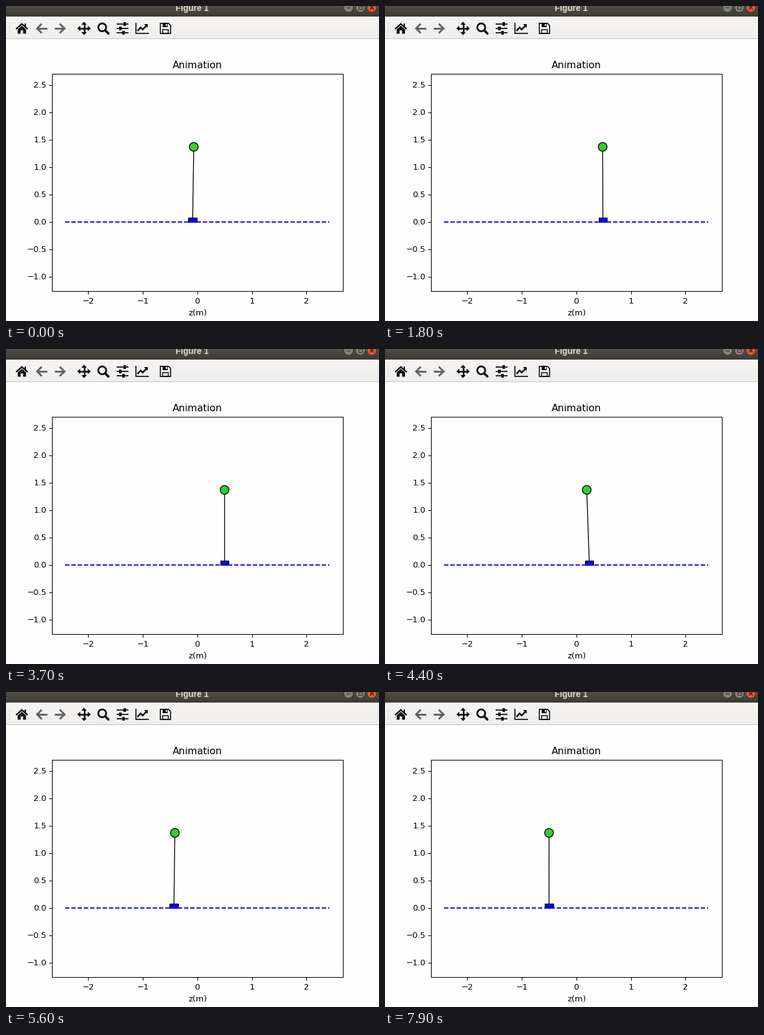
A matplotlib script that plays this animation: 600 px wide and 506 px high, repeating every 8 s.

```python
import numpy as np
import matplotlib.pyplot as plt
from matplotlib.animation import FuncAnimation
from matplotlib.patches import Circle, Polygon, Rectangle

W, H, DPI = 600, 506, 100
FRAMES, STEP_MS = 80, 100
PT = 72 / DPI  # points per pixel
SANS = "DejaVu Sans"
INK, GREY = "#0c0c0c", "#626262"

# the tiny margin keeps the pixel size from being rounded down
fig = plt.figure(figsize=(W / DPI + 1e-6, H / DPI + 1e-6), dpi=DPI,
                 facecolor="#fefefe")
ax = fig.add_axes([0, 0, 1, 1])
ax.set_xlim(0, W)
ax.set_ylim(H, 0)
ax.axis("off")


def line(xs, ys, color="black", w=1.1, z=2, cap="butt", **kw):
    return ax.plot(xs, ys, color=color, lw=w * PT, zorder=z,
                   solid_capstyle=cap, solid_joinstyle="miter", **kw)[0]


def rect(x0, y0, x1, y1, color, edge="none", w=0, z=1):
    return ax.add_patch(Rectangle((x0, y0), x1 - x0, y1 - y0, fc=color,
                                  ec=edge, lw=w * PT, zorder=z))


def poly(points, color=INK, z=3):
    ax.add_patch(Polygon(points, fc=color, ec="none", zorder=z))


def disc(x, y, r, color, edge="none", w=0, z=3):
    return ax.add_patch(Circle((x, y), r, fc=color, ec=edge, lw=w * PT, zorder=z))


def text(x, y, s, px, ha="center", va="baseline", color="black", **kw):
    kw.setdefault("family", SANS)
    ax.text(x, y, s, fontsize=px * PT, ha=ha, va=va, color=color, zorder=4, **kw)


def gradient(y0, y1, top, bottom):
    a, b = np.array(top), np.array(bottom)
    for y in range(y0, y1):
        k = (y - y0) / (y1 - y0 - 1)
        rect(0, y, W, y + 1, tuple((a + (b - a) * k) / 255))


def title_bar():
    gradient(0, 17, (80, 77, 71), (61, 59, 55))
    text(299.5, 7.5, "Figure 1", 13.6, color="#dfdbd2",
         family="Liberation Sans", weight="bold")
    for x in (551, 570):
        disc(x, 2.5, 7.6, "#85827a", "#34332f", 1)
    disc(588.5, 2.5, 7.6, "#e9592b", "#34332f", 1)
    line([548, 554], [3, 3], "#3c3b37", 1.5, 4)
    rect(567, 0, 573, 5.5, "none", "#3c3b37", 1.3, 4)
    for s in (-1, 1):
        line([588.5 - 3, 588.5 + 3], [2.5 - 3 * s, 2.5 + 3 * s], "#4a2415", 1.6, 4)


def home(x, y):
    line([x - 9.3, x, x + 9.3], [y + 1, y - 7.2, y + 1], INK, 2.4, 3)
    rect(x + 4, y - 8, x + 6.6, y - 2, INK, z=3)
    poly([(x - 6.7, y + 1.6), (x, y - 4.2), (x + 6.7, y + 1.6), (x + 6.7, y + 8.5),
          (x + 2, y + 8.5), (x + 2, y + 3.2), (x - 2, y + 3.2), (x - 2, y + 8.5),
          (x - 6.7, y + 8.5)])


def arrow(x, y, s):
    line([x - 7.5 * s, x + 9 * s], [y, y], GREY, 3, 3)
    line([x + 0.5 * s, x - 7 * s, x + 0.5 * s], [y - 7.5, y, y + 7.5], GREY, 3, 3)


def move(x, y):
    line([x - 8, x + 8], [y, y], INK, 2.6, 3)
    line([x, x], [y - 8, y + 8], INK, 2.6, 3)
    for dx, dy in ((1, 0), (-1, 0), (0, 1), (0, -1)):
        bx, by = x + 6 * dx, y + 6 * dy
        poly([(x + 10.7 * dx, y + 10.7 * dy),
              (bx + 4.4 * dy, by + 4.4 * dx), (bx - 4.4 * dy, by - 4.4 * dx)])


def zoom(x, y):
    disc(x - 1.7, y - 1.7, 6.3, "none", INK, 2.8)
    line([x + 3, x + 8.2], [y + 3, y + 8.2], INK, 3.8, 3, "round")


def sliders(x, y):
    for dy, knob in ((-7, 3), (0, -4), (7, 1)):
        line([x - 9.5, x + 9.5], [y + dy, y + dy], INK, 1.8, 3)
        rect(x + knob - 2, y + dy - 2.6, x + knob + 2, y + dy + 2.6, INK, z=3)


def chart(x, y):
    line([x - 10.2, x - 10.2, x + 11], [y - 9, y + 8.3, y + 8.3], INK, 1.7, 3)
    line([x - 7.5, x - 2.5, x + 0.8, x + 7], [y + 4, y - 1.5, y + 1.8, y - 4.5],
         INK, 2.6, 3)
    poly([(x + 3.2, y - 7.2), (x + 9.2, y - 7.2), (x + 9.2, y - 1.2)])


def save(x, y):
    ax.add_patch(Polygon([(x - 8.2, y - 8.2), (x + 4.8, y - 8.2), (x + 8.2, y - 4.8),
                          (x + 8.2, y + 8.2), (x - 8.2, y + 8.2)],
                         fc="none", ec=INK, lw=1.7 * PT, zorder=3))
    rect(x - 5, y - 8.2, x + 3.8, y - 2.4, INK, z=3)
    rect(x + 0.4, y - 7, x + 2.4, y - 3.6, "#f2f1f0", z=4)
    rect(x - 4.8, y + 2, x + 4.8, y + 8.2, "none", INK, 1.5, 3)


def toolbar():
    gradient(17, 52, (245, 244, 243), (239, 238, 237))
    rect(0, 52, W, 53, "#c3c1be")
    for y in range(28, 46, 3):
        rect(4.5, y, 6, y + 1.3, "#b5b3b0", z=3)
    home(25.5, 36)
    arrow(57, 36, 1)
    arrow(87, 36, -1)
    move(125.5, 36)
    zoom(156.5, 36)
    sliders(187.5, 36)
    chart(219, 36)
    save(256.5, 36)


X0, Y0, UNIT = 307.7, 346.6, 87.8  # pixel of the plot origin, pixels per metre


def plot_frame():
    rect(74, 109, 542, 458.5, "none", "black", 1.1, 5)
    for v in range(-2, 3):
        x = X0 + v * UNIT
        line([x, x], [458.5, 463.2])
        text(x, 478, f"{v}".replace("-", "\u2212"), 13.1)
    for v in np.arange(-1, 2.6, 0.5):
        y = Y0 - v * 88
        line([69.3, 74], [y, y])
        text(65, y + 4.8, f"{v:.1f}".replace("-", "\u2212"), 13.1, "right")
    text(307.5, 100, "Animation", 15.7)
    text(308, 496.5, "z(m)", 13.1)
    line([95.3, 519.8], [Y0, Y0], "blue", 1.9, dashes=(3.7, 1.6))


title_bar()
toolbar()
plot_frame()

CART_W, CART_TOP, BALL_Y = 13.6, 340, 226.3
cart = rect(0, CART_TOP, CART_W, 347, "blue", "black", 1.2, 1.5)
rod = line([0, 0], [CART_TOP, BALL_Y], w=1.35, z=2)
ball = disc(0, BALL_Y, 7, "limegreen", "black", 1.35, 3)

RATE, TILT, LAG = 2.95, 0.28, 0.85
UP, DOWN = -0.82, 3.74  # times when the set point jumps to +0.5 and -0.5


def response(tau):
    """Step response of the ball and its lead over the cart."""
    x = max(RATE * tau, 0)
    y = 1 - np.exp(-x) * (1 + x + x * x / 2)
    u = max(x - LAG, 0)
    return y, TILT * (u - u * u / 2) * np.exp(-u)


def draw(i):
    t = i * STEP_MS / 1000
    start, side = (UP, 1) if t < DOWN else (DOWN, -1)
    y, lead = response(t - start)
    bx = X0 + side * (y - 0.5) * UNIT
    cx = bx - side * lead * UNIT
    cart.set_x(cx - CART_W / 2)
    rod.set_xdata([cx, bx])
    ball.center = (bx, BALL_Y)
    return cart, rod, ball


anim = FuncAnimation(fig, draw, frames=FRAMES, interval=STEP_MS,
                     repeat=True, repeat_delay=0, blit=False)
plt.show()
```
